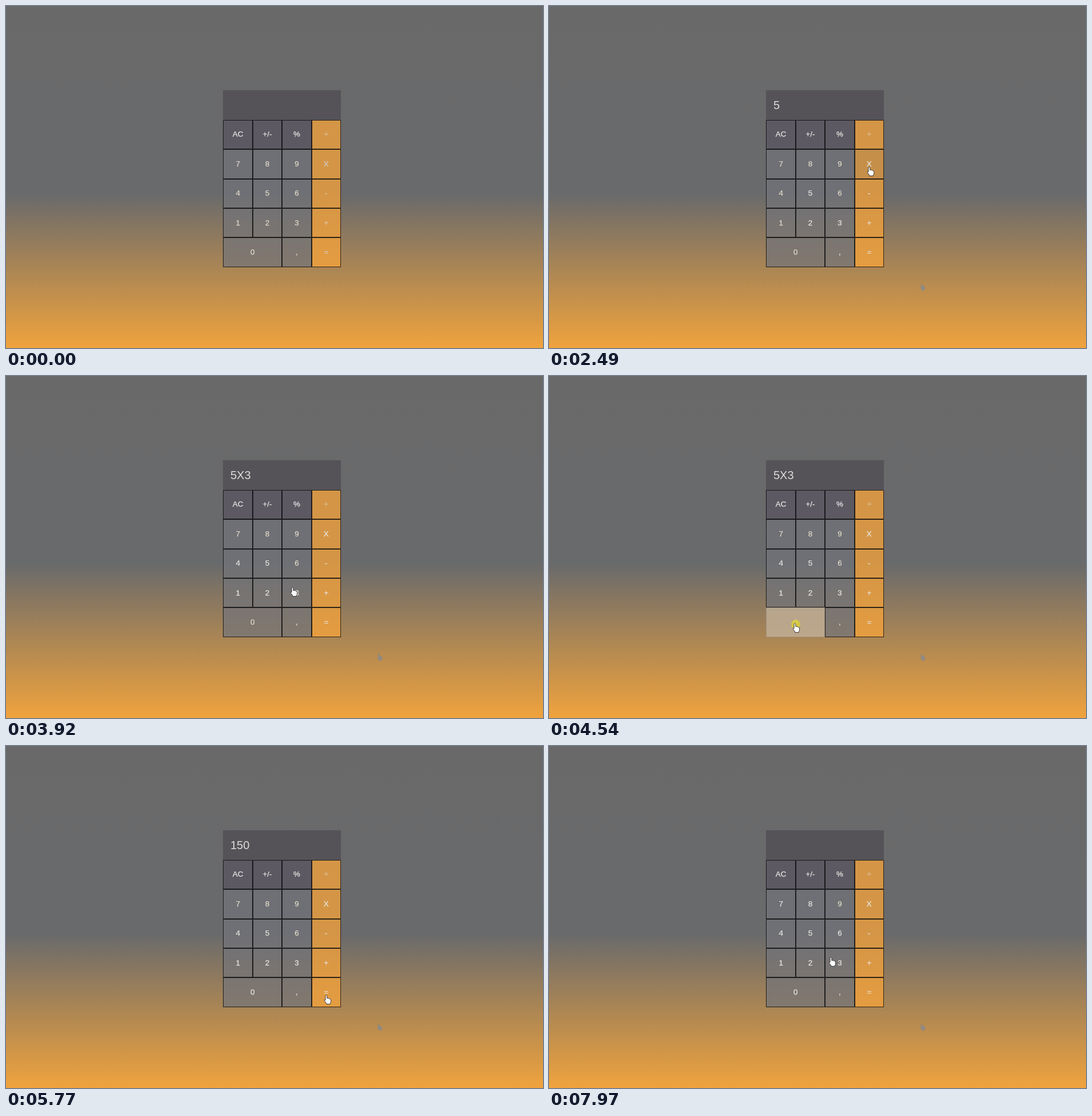
These frames come from a looping animation (938 px wide and 597 px high, 8 s). An HTML page with a canvas:

```html
<!DOCTYPE html>
<html lang="en">
<head>
<meta charset="utf-8">
<title>Calculator</title>
<style>
html, body { margin: 0; width: 100%; height: 100%; overflow: hidden; background: #69696a; }
canvas { display: block; width: 938px; height: 597px; }
</style>
</head>
<body>
<canvas id="stage" width="938" height="597"></canvas>
<script>
const ctx = document.getElementById('stage').getContext('2d');
const W = 938, H = 597, LOOP = 8000;
const START = 230, STEP = 68.4, PRESS = 140;
const LEFT = 379.4, TOP = 198.7, CELL = 51.4;
const FONT = '"Liberation Sans", Arial, sans-serif';

const layout = ['AC +/- % ÷', '7 8 9 X', '4 5 6 -', '1 2 3 +', '0 0 , ='];
const keys = [];
layout.forEach((line, row) => line.split(' ').forEach((label, col) => {
  if (label === '0' && col === 1) return;
  const span = label === '0' ? 2 : 1;
  const x = Math.round(LEFT + col * CELL), y = Math.round(TOP + row * CELL);
  keys.push({
    label, row, col, x, y,
    w: Math.round(LEFT + (col + span) * CELL) - x,
    h: Math.round(TOP + (row + 1) * CELL) - y,
    textX: LEFT + (col + span / 2) * CELL,
    textY: Math.round(TOP + (row + 0.5) * CELL + 4),
    seen: Infinity
  });
}));

// Each move glides to a point, may bend towards another, and may end in a click.
const moves = [
  { from: START, until: 1250, to: [463, 336], bend: [495, 480], click: 1250, text: '5' },
  { from: 1470, until: 2480, to: [562, 289], bend: [610, 588], click: 2550, text: '5X' },
  { from: 2830, until: 3460, to: [408, 352], bend: [506, 474] },
  { from: 3460, until: 3650, to: [503, 377], click: 3650, text: '5X3' },
  { from: 3930, until: 4250, to: [432, 440], click: 4530, text: '5X30', flash: '0' },
  { from: 4680, until: 5425, to: [562, 443], bend: [500, 510], click: 5630, text: '150' },
  { from: 5840, until: 6040, to: [709, 548] },
  { from: 6770, until: 7390, to: [405, 234], click: 7465, text: '' },
  { from: 7680, until: 7950, to: [495, 377] }
];
moves.forEach((m, i) => { m.start = i ? moves[i - 1].to : [842, 566]; });

const pressing = (m, t) => t >= m.click && t < m.click + PRESS;
const moveAt = t => moves.filter(m => t >= m.from).pop();

function pointerAt(t) {
  const m = moveAt(t);
  const u = Math.min(1, (t - m.from) / (m.until - m.from));
  const s = m.bend ? 1 - (1 - u) ** 2 : u;
  return m.to.map((end, i) => {
    const a = m.start[i], b = m.bend ? m.bend[i] : (a + end) / 2;
    return (1 - s) ** 2 * a + 2 * s * (1 - s) * b + s * s * end;
  });
}

function keyUnder([x, y]) {
  const px = x - 2, py = y - 7;
  return keys.find(k => px >= k.x && px < k.x + k.w && py >= k.y && py < k.y + k.h);
}

// Labels turn whiter once the pointer has passed over them.
for (let t = START; t < LOOP; t += STEP / 2) {
  const k = keyUnder(pointerAt(t));
  if (k) k.seen = Math.min(k.seen, t + 2 * STEP);
}

function drawBackground() {
  const g = ctx.createLinearGradient(0, 0, 0, H);
  g.addColorStop(0, '#69696a');
  g.addColorStop(0.55, '#696a6b');
  g.addColorStop(1, '#f0a33d');
  ctx.fillStyle = g;
  ctx.fillRect(0, 0, W, H);
}

function labelColor(k, t) {
  if (t >= k.seen || (k.row === 0 && k.col < 3)) return '#e8e7e2';
  if (k.label === 'X' || k.label === '=') return '#cfcbc6';
  return k.col === 3 ? '#dccdb2' : '#e2dac9';
}

function drawKey(k, t, hovered, flashed) {
  const orange = k.col === 3;
  ctx.fillStyle = flashed ? 'rgba(198,183,162,0.7)'
    : orange ? (hovered ? '#c58f4a' : 'rgba(248,165,58,0.75)')
    : k.row === 0 ? '#5c5963' : 'rgba(115,116,122,0.7)';
  ctx.fillRect(k.x, k.y, k.w, k.h);

  ctx.lineWidth = 1;
  ctx.strokeStyle = flashed ? 'rgba(60,50,40,0.2)' : 'rgba(10,10,12,0.82)';
  ctx.strokeRect(k.x + 0.5, k.y + 0.5, k.w - 1, k.h - 1);

  ctx.fillStyle = ctx.strokeStyle = flashed ? '#c9bba5' : labelColor(k, t);
  ctx.lineWidth = 0.25;
  ctx.fillText(k.label, k.textX, k.textY);
  ctx.strokeText(k.label, k.textX, k.textY);
}

function drawKeys(t) {
  ctx.font = '13.333px ' + FONT;
  ctx.textAlign = 'center';
  const m = moveAt(t);
  const hover = m && t < m.click ? keyUnder(pointerAt(t)) : null;
  const flash = m && pressing(m, t) ? m.flash : null;
  keys.forEach(k => drawKey(k, t, k === hover, k.label === flash));
}

function drawScreen(t) {
  ctx.fillStyle = '#555358';
  ctx.fillRect(379, 147, 206, 52);
  const last = moves.filter(m => t >= m.click + PRESS).pop();
  if (!last) return;
  ctx.font = '20px ' + FONT;
  ctx.textAlign = 'left';
  ctx.fillStyle = '#dedcd6';
  ctx.fillText(last.text, 392, 180);
}

const hand = new Path2D(
  'M-4-6.5Q-4-8-2.6-8Q-1.2-8-1.2-6.5V-2.6Q.6-3.4 1.4-2.2Q3-2.8 3.6-1.4' +
  'Q5.6-1.6 5.6.6V3Q5.6 5 4.2 6.2V7.6H-2.4V6.2L-5.6 1.8Q-6.4.2-5.2 0L-4 .8Z');

function drawHand(x, y, size, fill, stroke) {
  ctx.save();
  ctx.translate(x, y);
  ctx.scale(size, size);
  ctx.fillStyle = fill;
  ctx.fill(hand);
  ctx.lineWidth = 0.9;
  ctx.strokeStyle = stroke;
  ctx.stroke(hand);
  ctx.restore();
}

function drawPointer(t) {
  if (t >= 500) drawHand(653, 491, 0.68, '#8f8b86', '#8d8780');
  if (t < START) return;
  const [x, y] = pointerAt(t);
  if (pressing(moveAt(t), t)) {
    ctx.fillStyle = 'rgba(240,230,0,0.5)';
    ctx.beginPath();
    ctx.arc(x - 1, y - 6.5, 8, 0, Math.PI * 2);
    ctx.fill();
  }
  drawHand(x, y, 1, '#fff', '#2b2b2b');
}

function draw(now) {
  const raw = now % LOOP;
  // The pointer advances in discrete steps.
  const t = raw < START ? raw : START + STEP * Math.floor((raw - START + 14) / STEP);
  drawBackground();
  drawScreen(t);
  drawKeys(t);
  drawPointer(t);
}

const begin = performance.now();
function tick() {
  draw(performance.now() - begin);
  requestAnimationFrame(tick);
}
tick();
</script>
</body>
</html>
```
